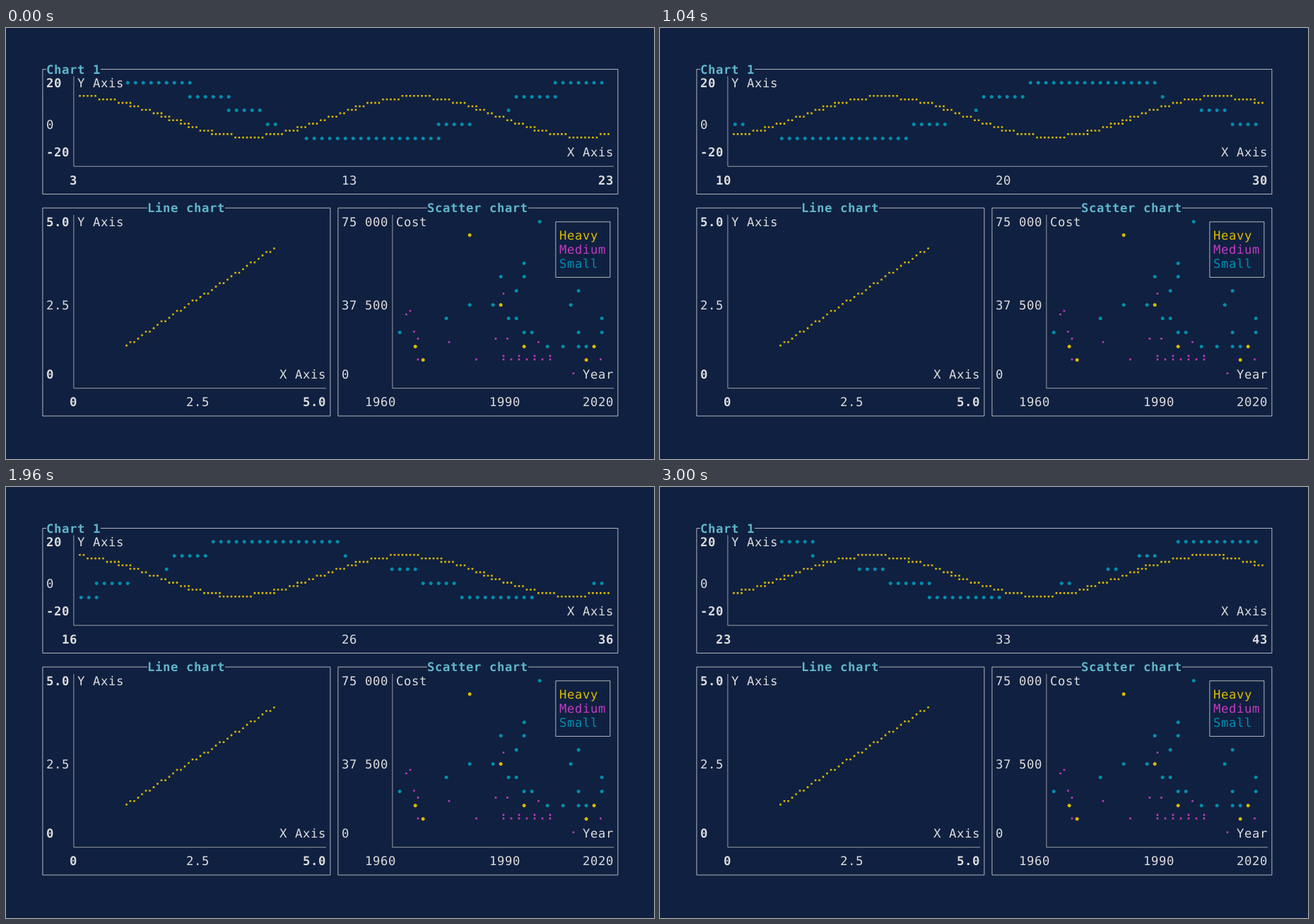
These frames come from a looping animation (917x611 px, 3.04 s). An HTML page:

```html
<!DOCTYPE html>
<html lang="en">
<head>
<meta charset="utf-8">
<title>Terminal charts</title>
<style>
  html, body { margin: 0; width: 100%; height: 100%; overflow: hidden; background: #102040; }
  svg { display: block; width: 917px; height: 611px; }
  text {
    font: 17.286px "DejaVu Sans Mono", monospace;
    letter-spacing: 0.593px;
    white-space: pre;
    text-rendering: geometricPrecision;
  }
  .bold { font-weight: bold; }
</style>
</head>
<body>
<svg id="stage" viewBox="0 0 917 611"></svg>
<script>
const FG = '#dddddd', AXIS = '#bebebe', TITLE = '#60b6cb';
const YELLOW = '#dbba00', MAGENTA = '#c43ac3', CYAN = '#008eb0';
const LOOP = 3040;

// Terminal grid: character cell to pixels
const CELL_W = 11, CELL_H = 19.66;
const cellX = col => 46 + col * CELL_W;
const cellY = row => 48.7 + row * CELL_H;
const midX = col => cellX(col) + 5.9;
const midY = row => cellY(row) + CELL_H / 2;
const baseline = row => cellY(row) + 15.8;

const stage = document.getElementById('stage');

function add(name, attrs, content = '') {
  const node = document.createElementNS('http://www.w3.org/2000/svg', name);
  for (const key in attrs) node.setAttribute(key, attrs[key]);
  node.textContent = content;
  return stage.appendChild(node);
}

const text = (col, row, content, fill = FG, bold = false) =>
  add('text', { x: cellX(col), y: baseline(row), fill, class: bold ? 'bold' : '' }, content);

const line = (d, stroke) => add('path', { d, stroke, fill: 'none', 'stroke-width': 0.8 });

// Small dots sit on a 2 x 4 raster inside each cell
const dotPath = (col, row, points) => points.map(([x, y]) => {
  const px = cellX(col) + 3.5 + x * CELL_W / 2 - 1.3;
  const py = cellY(row) + 3.36 + y * CELL_H / 4 - 1.3;
  return `M${px.toFixed(2)} ${py.toFixed(2)}h2.6v2.6h-2.6z`;
}).join('');

const dots = (col, row, points, fill) => add('path', { fill, d: dotPath(col, row, points) });

const bullets = (firstRow, rows, fill) => rows.forEach((cols, i) =>
  cols.forEach(col => text(col, firstRow + i, '•', fill)));

// Framed chart whose axes and labels follow from the box and the label lengths
function chart({ box: [c0, r0, c1, r1], title, centred, xName, yName, xLabels, yLabels, bold }) {
  const axis = c0 + 1 + Math.max(...yLabels.map(label => label.length));
  const titleCol = c0 + 1 + (centred ? (c1 - c0 - 1 - title.length) >> 1 : 0);
  const third = Math.floor((c1 - axis - 1) / 3);
  const xCols = [
    label => axis + 1 - label.length,
    label => axis + 2 + third + ((third - 1 - label.length) >> 1),
    label => c1 - label.length
  ];

  line(`M${cellX(titleCol)} ${midY(r0)}H${midX(c0)}V${midY(r1)}H${midX(c1)}` +
       `V${midY(r0)}H${cellX(titleCol + title.length)}`, FG);
  text(titleCol, r0, title, TITLE, true);
  line(`M${midX(axis)} ${cellY(r0 + 1)}V${midY(r1 - 2)}H${cellX(c1)}`, AXIS);
  text(axis + 1, r0 + 1, yName);
  text(c1 - xName.length, r1 - 3, xName);

  const yRows = [r0 + 1, Math.round((r0 + r1 - 2) / 2), r1 - 3];
  yLabels.forEach((label, i) => text(c0 + 1, yRows[i], label, FG, bold && i !== 1));

  const xNodes = xCols.map((_, i) => text(0, r1 - 1, '', FG, bold && i !== 1));
  const setX = labels => labels.forEach((label, i) => {
    xNodes[i].textContent = label;
    xNodes[i].setAttribute('x', cellX(xCols[i](label)));
  });
  setX(xLabels);
  return setX;
}

// Line from one raster point to another, rising to the right
function risingLine(x0, y0, x1, y1) {
  const dx = x1 - x0, dy = y0 - y1, points = [];
  let error = 2 * dy - dx;
  for (let x = x0, y = y0; x <= x1; x++) {
    points.push([x, y]);
    if (error > 0) { y--; error -= 2 * dx; }
    error += 2 * dy;
  }
  return points;
}

const setWindowLabels = chart({
  box: [0, 0, 74, 9], title: 'Chart 1', xName: 'X Axis', yName: 'Y Axis',
  xLabels: [], yLabels: ['20', '0', '-20'], bold: true
});

chart({
  box: [0, 10, 37, 25], title: 'Line chart', centred: true, xName: 'X Axis', yName: 'Y Axis',
  xLabels: ['0', '2.5', '5.0'], yLabels: ['5.0', '2.5', '0'], bold: true
});
dots(5, 11, risingLine(12, 37, 50, 9), YELLOW);

chart({
  box: [38, 10, 74, 25], title: 'Scatter chart', centred: true, xName: 'Year', yName: 'Cost',
  xLabels: ['1960', '1990', '2020'], yLabels: ['75 000', '37 500', '0']
});
bullets(12, [[55], [], [], [], [], [59], [], [], [48, 62, 71], [49, 70]], YELLOW);
bullets(11, [
  [64], [], [], [62], [59, 62], [61, 69], [55, 58, 68],
  [52, 60, 61, 72], [46, 62, 63, 69, 72], [65, 67, 69, 70]
], CYAN);

// Lone dots, then a dense zigzag band of cheap ones
const medium = [
  [2, 28], [3, 27], [4, 33], [5, 35], [5, 41], [13, 36], [20, 41],
  [25, 35], [28, 35], [27, 22], [36, 36], [45, 45], [52, 41]
];
for (let x = 27; x < 40; x += 2) {
  medium.push([x, 41]);
  if (x % 4 === 3) medium.push([x, 40]);
}
dots(46, 11, medium, MAGENTA);

line(`M${midX(66)} ${midY(11)}H${midX(73)}V${midY(15)}H${midX(66)}Z`, FG);
text(67, 12, 'Heavy', YELLOW);
text(67, 13, 'Medium', MAGENTA);
text(67, 14, 'Small', CYAN);

// Moving signals of the top chart
const COLS = 69, ROWS = 6, SPAN = 20, LIMIT = 20;

function signal(step, period, scale, count) {
  const points = [];
  for (let i = 0, x = 0; i < count; i++, x += step) points.push([x, Math.sin(x / period) * scale]);
  return points;
}
const slow = signal(0.2, 3, 18, 330);
const fast = signal(0.1, 2, 10, 440);

function raster(points, start, width, height) {
  const seen = new Map();
  for (const [x, y] of points) {
    if (x < start || x > start + SPAN) continue;
    const px = Math.floor((x - start) * (width - 1) / SPAN);
    const py = Math.floor((LIMIT - y) * (height - 1) / (2 * LIMIT));
    seen.set(px + ',' + py, [px, py]);
  }
  return [...seen.values()];
}

const slowLayer = add('g', { fill: CYAN });
const fastLayer = dots(5, 1, [], YELLOW);

function drawWindow(start) {
  const fine = raster(fast.slice(start * 10, start * 10 + 200), start, COLS * 2, ROWS * 4);
  const taken = new Set(fine.map(([x, y]) => (x >> 1) + ',' + (y >> 2)));
  for (let col = 0; col < 6; col++) taken.add(col + ',0'); // under the axis name

  const coarse = raster(slow.slice(start * 5, start * 5 + 200), start, COLS, ROWS);
  slowLayer.innerHTML = coarse
    .filter(cell => !taken.has(cell.join()))
    .map(([x, y]) => `<text x="${cellX(5 + x)}" y="${baseline(1 + y)}">•</text>`)
    .join('');
  fastLayer.setAttribute('d', dotPath(5, 1, fine));
  setWindowLabels([start, start + SPAN / 2, start + SPAN].map(String));
}

// The window moves on by one every 160 ms, with a few shorter waits
const FIRST = 3, shortWaits = [0, 1, 9, 14, 19];
const ticks = [];
for (let i = 0, t = 0; i < 20; i++) ticks.push(t += shortWaits.includes(i) ? 120 : 160);

let shown = -1;
function render() {
  const t = performance.now() % LOOP;
  const start = FIRST + ticks.filter(tick => tick <= t).length;
  if (start !== shown) drawWindow(shown = start);
  requestAnimationFrame(render);
}
render();
</script>
</body>
</html>
```
